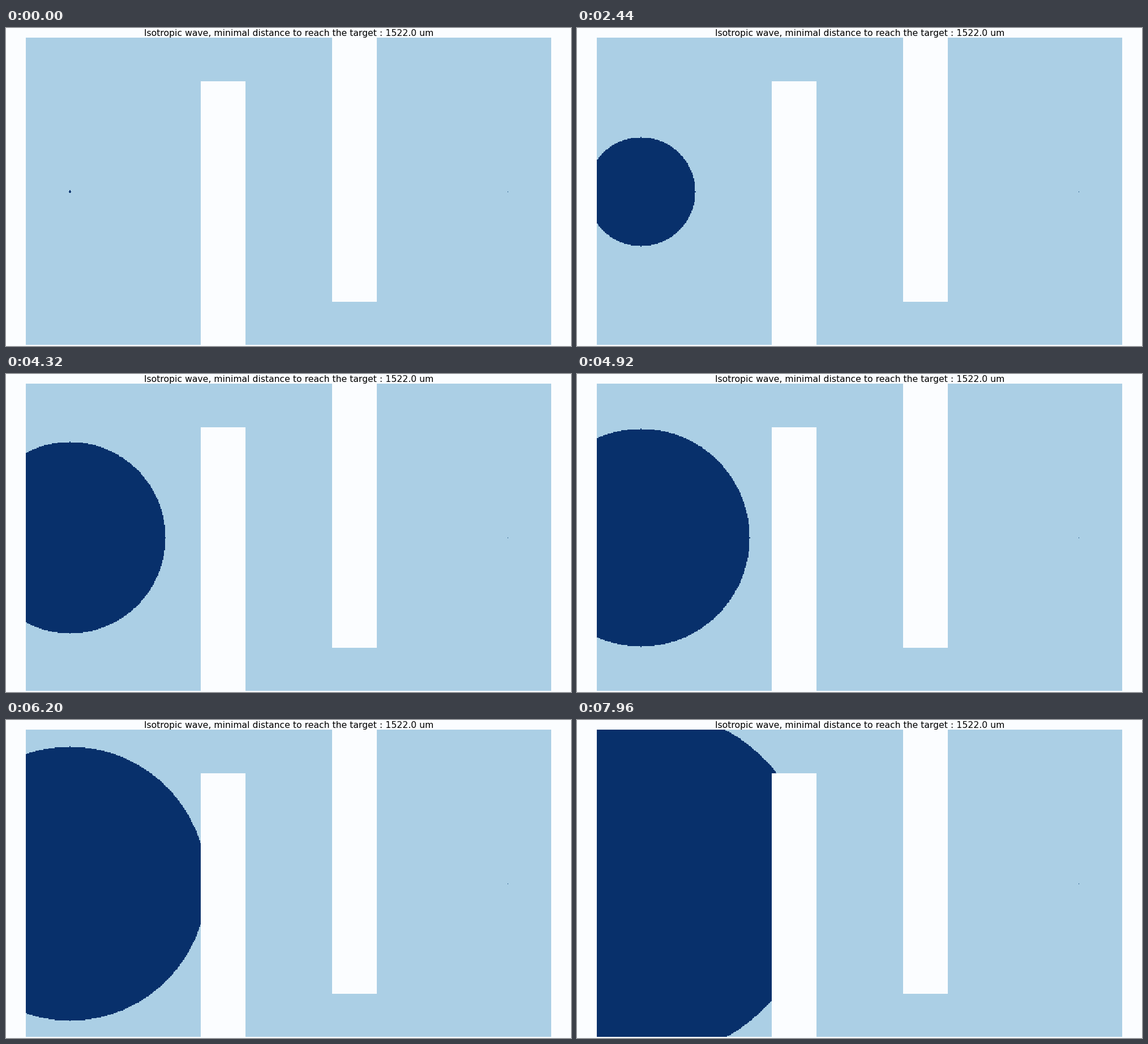
Write a matplotlib script that moves like this. It is 998 by 561 pixels and loops after 8 s.

```python
import numpy as np
import matplotlib.pyplot as plt
from matplotlib.animation import FuncAnimation

W, H, DPI = 998, 561, 100
FRAMES, STEP = 200, 40
COLS, ROWS, CELL = 600, 350, 1.546
LEFT, TOP = 35.1, 17.95

PAPER = (251, 253, 255)
FIELD = (171, 207, 229)
WAVE = (8, 48, 107)
GOAL_TINT = (62, 112, 152)

START = (50, 175)
GOAL = (550, 175)
CORNER = (200, 49)  # free cell on the tip of the first wall

x, y = np.meshgrid(np.arange(COLS), np.arange(ROWS))


def build_walls():
    walls = np.zeros((ROWS, COLS), bool)
    walls[50:, 200:251] = True
    walls[:301, 350:401] = True
    return walls


def travel_distance():
    """Shortest path from the start, bending round the first wall."""
    direct = np.hypot(x - START[0], y - START[1])
    cx, cy = CORNER[0] - START[0], START[1] - CORNER[1]
    bent = np.hypot(cx, cy) + np.hypot(x - CORNER[0], y - CORNER[1])
    hidden = (x >= CORNER[0]) & ((START[1] - y) * cx < (x - START[0]) * cy)
    return np.where(hidden, bent, direct)


walls = build_walls()
dist = np.where(walls, np.inf, travel_distance())

base = np.empty((ROWS, COLS, 3), np.uint8)
base[:] = FIELD
base[walls] = PAPER
base[GOAL[1], GOAL[0]] = GOAL_TINT


def wave_image(radius):
    img = base.copy()
    img[dist <= radius + 1e-9] = WAVE
    return img


paper = tuple(c / 255 for c in PAPER)
fig = plt.figure(figsize=(W / DPI, H / DPI), dpi=DPI, facecolor=paper)
ax = fig.add_axes([0, 0, 1, 1])
ax.axis("off")
picture = ax.imshow(
    wave_image(1),
    extent=(LEFT, LEFT + COLS * CELL, TOP + ROWS * CELL, TOP),
    interpolation="nearest",
    aspect="auto",
)
ax.set_xlim(0, W)
ax.set_ylim(H, 0)
ax.text(
    W / 2 + 0.3, 14.2,
    "Isotropic wave, minimal distance to reach the target : 1522.0 um",
    family="DejaVu Sans", size=15.6 * 72 / DPI, color="black",
    ha="center", va="baseline",
)


def update(i):
    picture.set_data(wave_image(i + 1))
    return (picture,)


anim = FuncAnimation(fig, update, frames=FRAMES, interval=STEP,
                     repeat=True, repeat_delay=0, blit=False)
plt.show()
```
